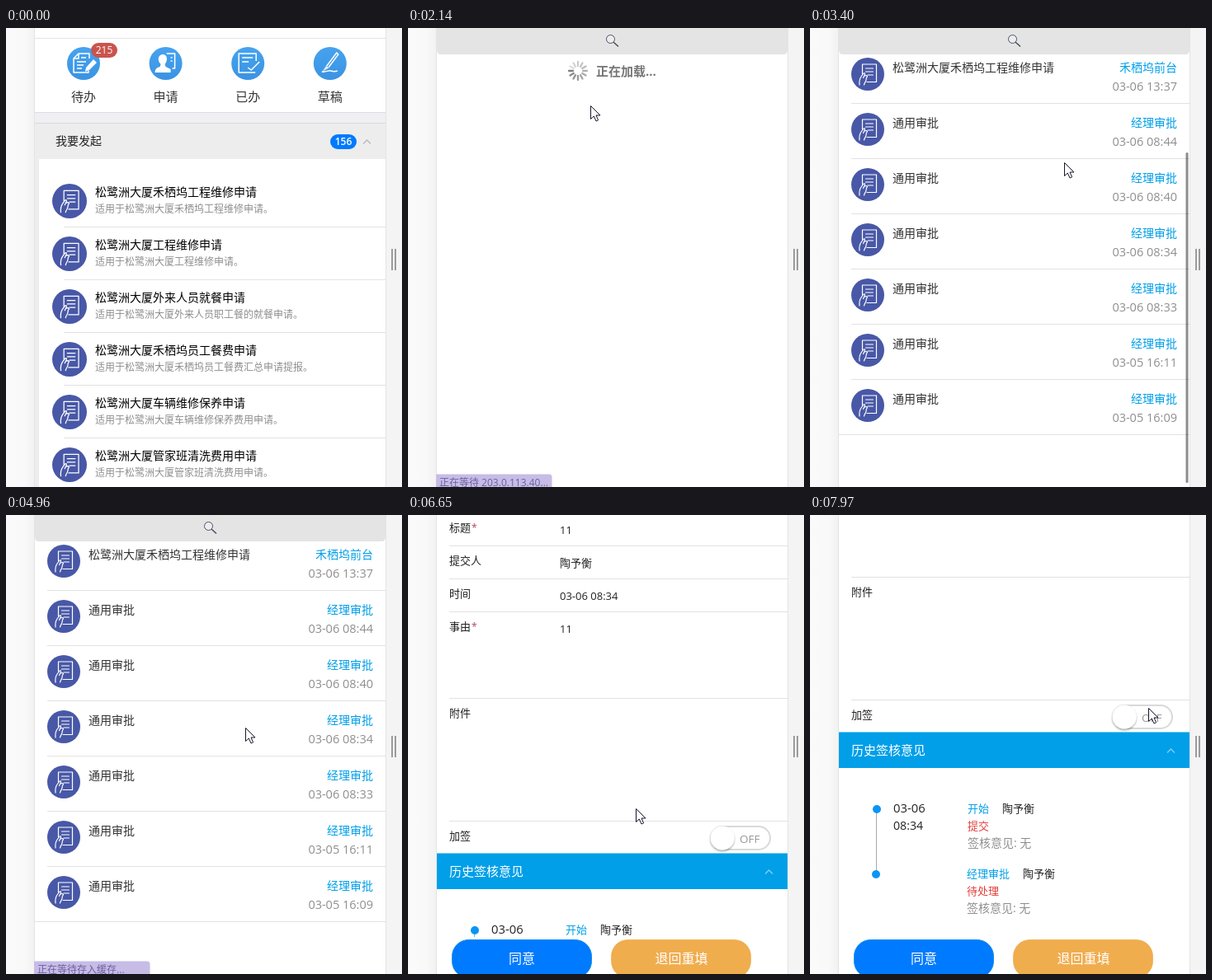
An HTML page that plays this animation: 480 by 557 pixels, repeating every 8000 ms.

```html
<!DOCTYPE html>
<html lang="zh-CN">
<head>
<meta charset="utf-8">
<style>
html, body { margin: 0; width: 480px; height: 557px; overflow: hidden; background: #f8f8f8; }
svg { display: block; }
text { font-family: "Open Sans", "Noto Sans CJK SC", "Noto Sans CJK", sans-serif; white-space: pre; }
</style>
</head>
<body>
<svg id="stage" width="480" height="557" viewBox="0 0 480 557">
  <defs>
    <linearGradient id="edge"><stop offset="0" stop-color="#fafafa"/><stop offset=".65" stop-color="#f9f9f9"/><stop offset="1" stop-color="#f1f1f1"/></linearGradient>
    <linearGradient id="sky" x2="0" y2="1"><stop offset="0" stop-color="#46a3f0"/><stop offset="1" stop-color="#3a93e2"/></linearGradient>
    <filter id="soft" x="-50%" y="-50%" width="200%" height="200%"><feDropShadow dx="0" dy="1.5" stdDeviation="1.3" flood-opacity=".4"/></filter>
    <clipPath id="page"><rect x="35" width="426" height="557"/></clipPath>
    <clipPath id="listArea"><rect x="35" y="32" width="426" height="525"/></clipPath>
    <clipPath id="formArea"><rect x="35" width="426" height="512"/></clipPath>
    <g id="docIcon">
      <circle r="20" fill="#4858a7"/>
      <g fill="none" stroke="#fff" stroke-width="1.2" stroke-linecap="round" stroke-linejoin="round">
        <path d="M-6.5 0V-12H10.5V9.5H-1M-2.5-7H6.5M-2.5-3H6.5M0 1H6.5"/>
        <path d="M-10 13C-10.5 9-10 6-8 3L-5-1C-3.5-2-3 0-4 1.5L-5.5 4.5M-4 2L-1.5 1.5C0 2-.5 3.5-1.5 4L-2 7C-2 9-4 10-4.5 13"/>
      </g>
    </g>
  </defs>
  <rect width="35" height="557" fill="url(#edge)"/>
  <rect x="460" width="20" height="557" fill="#f4f4f4"/>
  <rect x="35" width="425" height="557" fill="#fff"/>
  <g id="home" clip-path="url(#page)"></g>
  <g id="list"><g clip-path="url(#listArea)"><g id="rows"></g></g></g>
  <g id="form"><g clip-path="url(#formArea)"><g id="fields"></g></g></g>
  <g id="loading"></g>
  <path d="M34.5 0V557M460.5 0V557" stroke="#e4e4e4"/>
  <path d="M468 268V294M472 268V294" stroke="#929292" stroke-width="1.8"/>
  <rect id="bar" width="3" rx="1.5"/>
  <g id="status">
    <path d="M34 557V541.5H171Q174.5 541.5 174.5 545V557Z" fill="#c6bce6"/>
  </g>
  <path id="cursor" d="M.5.5V16.5L4.3 13 7 19 9.6 17.8 7 12H12Z" fill="#fff" stroke="#15152a" stroke-linejoin="round"/>
</svg>
<script>
const $ = id => document.getElementById(id);
const LOOP = 8000;
const TOWER = '松鹭洲大厦', BAY = '禾栖坞', PERSON = '陶予衡';
const WAIT_HOST = '正在等待 203.0.113.40...', WAIT_CACHE = '正在等待存入缓存...';
const CYAN = '#009fe8', GRAY = '#8e8e8e', RED = '#e2403a';

const add = (id, html) => $(id).insertAdjacentHTML('beforeend', html);
// y is the visual middle of the line
const text = (x, y, s, size, fill = '#222', extra = '') =>
  `<text x="${x}" y="${y + size * .37}" font-size="${size}" fill="${fill}" ${extra}>${s}</text>`;
const rect = (x, y, w, h, fill, rx = 0, extra = '') =>
  `<rect x="${x}" y="${y}" width="${w}" height="${h}" rx="${rx}" fill="${fill}" ${extra}/>`;
const rule = (x, y, color = '#e2e2e2') => rect(x, y, 460 - x, 1, color);
const docIcon = (x, y, scale = 1) =>
  `<use href="#docIcon" transform="translate(${x} ${y}) scale(${scale})"/>`;
const chevron = (y, color) =>
  `<path d="M433 ${y + 2.5}L437.5 ${y - 2}L442 ${y + 2.5}" fill="none" stroke="${color}" stroke-width="1.3"/>`;
const MIDDLE = 'text-anchor="middle"', END = 'text-anchor="end"', MEDIUM = 'font-weight="500"';
const BADGE = MIDDLE + ' font-weight="600"';

function buildHome() {
  // each tile: label, outline, solid part
  const tiles = [
    ['待办', 'M7-6V-12H-6L-12-6V11H6V8M-12-6H-6V-12M-3-7H3M-8-2H3M-8 2H0M-8 6H-2', 'M3 5L12-5 16-1 7 8 2 10Z'],
    ['申请', 'M1-12H11V6H8M6-7H8M6-3H8', 'M-13 11C-13 6-10 5-7 4L-6 1C-11-4-9-11-3.5-11 2-11 3-4-1 1L0 4 6 7V11Z'],
    ['已办', 'M10-3V-12H-11V11H9M-7-7H6M-7-2H1M0 5L4 8 14-2', ''],
    ['草稿', 'M8-13L-4 3-8 9-2 5 10-11ZM-10 10C-5 11-2 8 1 9S6 10 9 9', 'M-8 9L-4 3-2 5Z']
  ];
  add('home', rule(35, 12));
  tiles.forEach(([label, outline, solid], i) => {
    const x = 94 + i * 99.6;
    add('home', `<g transform="translate(${x} 43)"><circle r="20" fill="url(#sky)"/>
      <path d="${outline}" fill="none" stroke="#fff" stroke-width="1.5" stroke-linejoin="round"/>
      <path d="${solid}" fill="#fff" stroke="#409ae8" paint-order="stroke"/></g>` +
      text(x, 83.5, label, 15, '#333', MIDDLE));
  });
  add('home', rect(103, 18, 32, 18, '#c9544e', 9) + text(119, 27, '215', 12, '#fff', MIDDLE) +
    rect(35, 102, 425, 14, '#efeff4') + rule(35, 102, '#dedee2') + rule(35, 115, '#dadada') +
    rect(35, 116, 425, 43, '#ededed') + rect(35, 159, 5, 398, '#ededed') +
    text(60, 137, '我要发起', 14) +
    rect(393, 129, 32, 18, '#007aff', 9) + text(409, 138, '156', 12, '#fff', BADGE) +
    chevron(138, '#b9b9b9'));
  [
    [BAY + '工程维修申请'],
    ['工程维修申请'],
    ['外来人员就餐申请', '外来人员职工餐的就餐申请'],
    [BAY + '员工餐费申请', BAY + '员工餐费汇总申请提报'],
    ['车辆维修保养申请', '车辆维修保养费用申请'],
    ['管家班清洗费用申请']
  ].forEach(([title, note = title], i) => {
    const y = 210 + i * 64;
    add('home', docIcon(77, y, 1.05) + text(108, y - 11, TOWER + title, 14, '#000') +
      text(108, y + 10, `适用于${TOWER}${note}。`, 12, GRAY) + rule(70, y + 31));
  });
}

function buildList() {
  const times = ['06 15:20', '06 14:05', '06 13:37', '06 08:44', '06 08:40', '06 08:34', '06 08:33', '05 16:11', '05 16:09'];
  add('rows', rect(35, 370, 425, 66, '#ececec', 0, 'id="pressed"'));
  times.forEach((time, i) => {
    const y = 34 + i * 67, repair = i < 3;
    add('rows', docIcon(70, y + 32) +
      text(100, y + 24, repair ? `${TOWER}${BAY}工程维修申请` : '通用审批', 14, '#333') +
      text(445, y + 24, repair ? BAY + '前台' : '经理审批', 14, CYAN, END) +
      text(445, y + 47, '03-' + time, 14.5, GRAY, END) +
      rule(i < times.length - 1 ? 50 : 35, y + 67));
  });
  add('list', `<path d="M35 0H460V27Q460 32 455 32H40Q35 32 35 27Z" fill="#e4e4e4"/>
    <circle cx="245.5" cy="13.5" r="5" fill="#ededed" stroke="#4a4f6e" stroke-width="1"/>
    <path d="M249.2 17.2L255 22.5" stroke="#4a4450" stroke-width="1.4"/>`);
}

function buildForm() {
  const star = '<tspan fill="#b04a5a" dx="1" font-size="12">*</tspan>';
  const field = (y, label, value = '') => text(50, y, label, 13) + text(184, y + 3, value, 13);
  add('fields', field(15, '标题' + star, '11') + field(55, '提交人', PERSON) +
    field(95, '时间', '03-06 08:34') + field(135, '事由' + star, '11') +
    text(50, 240, '附件', 13, '#222', MEDIUM) + field(389, '加签') +
    [37, 77, 117, 222, 371].map(y => rule(50, y)).join('') +
    rect(367, 378, 72, 28, '#fff', 14, 'stroke="#d9d9d9" stroke-width="2"') +
    '<circle cx="381" cy="392" r="14.5" fill="#fff" filter="url(#soft)"/>' +
    text(402, 393, 'OFF', 13.5, '#999') +
    rect(35, 410.5, 425, 43.5, CYAN) +
    text(50, 432, '历史签核意见', 15, '#fff', MEDIUM) + chevron(433, '#7fd0f4') +
    rect(80, 504, 1, 79, '#a8a8a8') +
    text(101, 503, '03-06', 14.8) + text(101, 524, '08:34', 14.2));
  [[191, 504, '开始', 233, '提交'], [190, 583, '经理审批', 258, '待处理']].forEach(([x, y, step, nameX, state]) =>
    add('fields', `<circle cx="${x - 110}" cy="${y}" r="5" fill="#0a95f5"/>` +
      text(x, y - 1, step, 13, CYAN) + text(nameX, y - 1, PERSON, 13) +
      text(x, y + 20, state, 13, RED) + text(x, y + 41, '签核意见: 无', 14, GRAY)));
  add('form', rect(53.5, 515.5, 169, 46, '#007aff', 20, 'stroke="#1191e6"') +
    text(138, 538, '同意', 16, '#fff', MIDDLE) +
    rect(246.5, 515.5, 169, 46, '#f0ad4e', 20, 'stroke="#eea236" stroke-opacity=".6"') +
    text(331.5, 538, '退回重填', 16, '#fff', MIDDLE));
}

function buildLoading() {
  const spokes = Array.from({ length: 12 }, (_, i) =>
    `<path d="M0-6V-11" transform="rotate(${i * 30})" stroke="#666" stroke-width="2.3" stroke-linecap="round" opacity="${.22 + .6 * i / 11}"/>`);
  add('loading', `<g id="spinner">${spokes.join('')}</g>` +
    text(228, 52, '正在加载...', 15, '#757575', 'font-weight="700"'));
}

const smooth = k => k * k * (3 - 2 * k);
// keys are [time, ...values]
function track(keys, t) {
  if (t <= keys[0][0]) return keys[0].slice(1);
  const i = keys.findIndex(key => key[0] > t);
  if (i < 0) return keys[keys.length - 1].slice(1);
  const a = keys[i - 1], b = keys[i], k = smooth((t - a[0]) / (b[0] - a[0]));
  return a.slice(1).map((v, n) => v + (b[n + 1] - v) * k);
}
const within = (t, from, to) => t >= from && t < to;
const show = (id, on) => $(id).setAttribute('display', on ? 'inline' : 'none');
const move = (id, x, y, extra = '') => $(id).setAttribute('transform', `translate(${x} ${y}) ${extra}`);

const pointer = [
  [210, 392, 504], [430, 250, 290], [680, 46, 88], [840, 92, 40], [1530, 92, 40],
  [2140, 221, 94], [2220, 221, 94], [2620, 300, 320], [3170, 308, 163], [3480, 308, 163],
  [4040, 288, 238], [4700, 288, 238], [4960, 290, 258], [5410, 290, 258],
  [6150, 276, 356], [6740, 276, 356], [7130, 262, 138], [7290, 264, 80],
  [7580, 310, 170], [7920, 390, 248], [7970, 410, 234]
];
const LIST_MAX = 144, FORM_MAX = 147;
const listScroll = [[2660, 0], [3080, LIST_MAX], [3180, 152], [3370, LIST_MAX]];
const formScroll = [[6740, 0], [7130, 151], [7290, 180], [7650, FORM_MAX]];
const listBar = [[2650, 0], [2720, .45], [3600, .45], [3950, 0]];
const formBar = [[6740, 0], [6820, .3], [7550, .3], [7900, 0]];

function drawBar(x, top, bottom, length, scroll, max, opacity) {
  const over = Math.max(0, scroll - max);
  const height = length - over;
  const y = over ? bottom - height : top + (bottom - length - top) * scroll / max;
  Object.entries({ x, y, height, 'fill-opacity': opacity }).forEach(([k, v]) => $('bar').setAttribute(k, v));
}

function draw(t) {
  const inList = within(t, 1530, 5410), inForm = t >= 6150;
  const waiting = within(t, 1530, 2350) || within(t, 5410, 6150);
  show('home', t < 1530);
  show('list', inList);
  show('rows', t >= 2350);
  show('form', inForm);
  show('loading', waiting);
  show('pressed', within(t, 4090, 4300));
  show('status', within(t, 980, 2350) || within(t, 4250, 6150));
  show('cursor', t >= 210);

  $('statusText').textContent = within(t, 4710, 5270) ? WAIT_CACHE : WAIT_HOST;
  move('spinner', 206, 52, `rotate(${Math.floor(t / 80) % 12 * 30 - 120})`);
  move('cursor', ...track(pointer, t).map(Math.round));

  const [listY] = track(listScroll, t), [formY] = track(formScroll, t);
  move('rows', 0, -Math.round(listY));
  move('fields', 0, -Math.round(formY));
  if (inForm) drawBar(454, 0, 511, 402, formY, FORM_MAX, track(formBar, t)[0]);
  else drawBar(455.5, 36, 552, 401, listY, LIST_MAX, track(listBar, t)[0]);
}

buildHome();
buildList();
buildForm();
buildLoading();
add('status', text(38, 552, '', 12, '#6f5fa0', 'id="statusText"'));

const start = performance.now();
function tick() {
  draw((performance.now() - start) % LOOP);
  requestAnimationFrame(tick);
}
tick();
</script>
</body>
</html>
```
